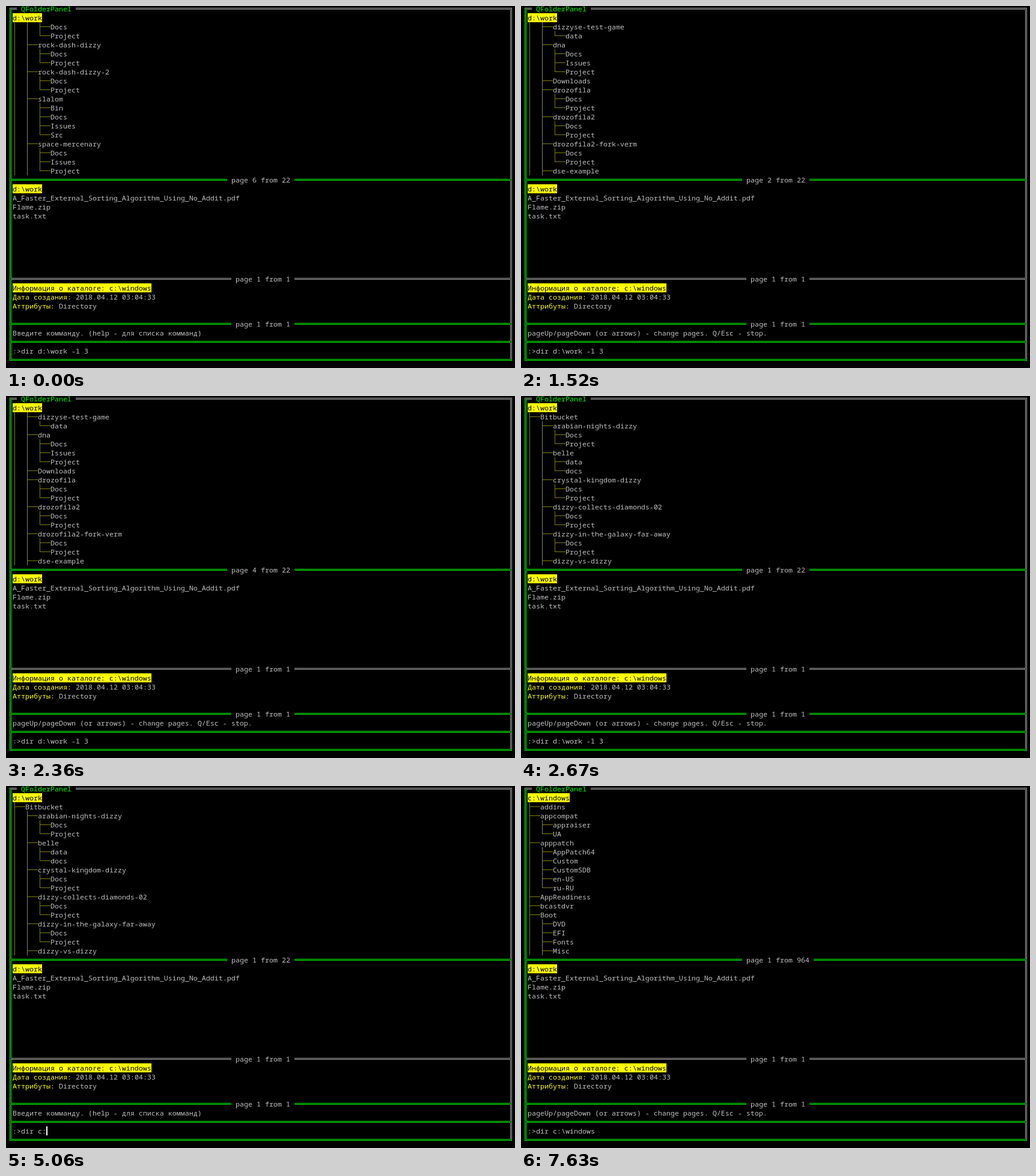
Animation of 847 by 603 pixels, one loop 8 s. Source, as an HTML page with a canvas:

```html
<!DOCTYPE html>
<html lang="ru">
<head>
<meta charset="utf-8">
<title>File manager</title>
<style>
  html, body { margin: 0; width: 100%; height: 100%; overflow: hidden; background: #000; }
  canvas { display: block; }
</style>
</head>
<body>
<canvas id="screen" width="847" height="603"></canvas>
<script>
const ctx = document.getElementById('screen').getContext('2d');
const LOOP = 8000, PAGE_ROWS = 17;
const CELL_W = 7, CELL_H = 15, LEFT = 4, TOP = -3;
const GREEN = '#00ff00', GREY = '#c0c0c0', YELLOW = '#ffff00', OLIVE = '#808000', DIM = '#a8a8a8';
const BRANCH_COLORS = [OLIVE, '#808080', OLIVE];

// "name/" holds Docs and Project, "name:a,b" holds a and b.
function parseTree(text, depth) {
  return text.trim().split(/\s+/).flatMap(item => {
    const [name, list] = item.replace(/\/$/, ':Docs,Project').split(':');
    const children = list ? list.split(',') : [];
    return [{ name, depth }, ...children.map(child => ({ name: child, depth: depth + 1 }))];
  });
}

// An entry closes its branch when a shallower entry comes before the next sibling.
function markLast(entries) {
  entries.forEach((entry, i) => {
    const next = entries.slice(i + 1).find(other => other.depth <= entry.depth);
    entry.last = !!next && next.depth < entry.depth;
  });
  return entries;
}

const work = {
  path: 'd:\\work', pages: 22,
  entries: markLast([{ name: 'Bitbucket', depth: 0 }, ...parseTree(`
    arabian-nights-dizzy/ belle:data,docs crystal-kingdom-dizzy/
    dizzy-collects-diamonds-02/ dizzy-in-the-galaxy-far-away/ dizzy-vs-dizzy/
    dizzy-winter-tale/ dizzy-wonder-island/ dizzy-world-tour/ dizzy-zero-hour/ dizzyse-core/
    dizzyse-test-game:data dna:Docs,Issues,Project Downloads
    drozofila/ drozofila2/ drozofila2-fork-verm/ dse-example:Bin,Docs,Src
    editor/ escape/ flame/ forest-quest/ graphics island-dizzy/
    jungle/ labyrinth/ magic-land/ maze-walker/ notes:data robot/
    rock-dash-dizzy/ rock-dash-dizzy-2/ slalom:Bin,Docs,Issues,Src
    space-mercenary:Docs,Issues,Project tools`, 1)])
};

const windows = {
  path: 'c:\\windows', pages: 964,
  entries: markLast(parseTree(`
    addins appcompat:appraiser,UA apppatch:AppPatch64,Custom,CustomSDB,en-US,ru-RU
    AppReadiness bcastdvr Boot:DVD,EFI,Fonts,Misc`, 0))
};

const ASK = 'Введите комманду. (help - для списка комманд)';
const PAGING = 'pageUp/pageDown (or arrows) - change pages. Q/Esc - stop.';

// page is the listing shown, label is the number in the divider.
const initial = { dir: work, page: 6, label: 6, hint: ASK, command: 'dir d:\\work -l 3', cursor: '' };
const turnPage = (time, page) => [[time, { page }], [time + 30, { label: page }]];

const typed = 'dir c:\\windows';
const keyTimes = [3920, 4010, 4160, 4340, 4770, 5060, 5530, 5810, 6040, 6120, 6510, 6710, 6850, 7060];

const events = [
  [520, { cursor: 'below' }],
  [610, { page: 1 }],
  [640, { label: 1 }],
  [670, { hint: PAGING, cursor: '' }],
  ...turnPage(1300, 2), ...turnPage(1520, 3), ...turnPage(1640, 4),
  ...turnPage(1810, 5), ...turnPage(2170, 4),
  ...turnPage(2360, 3), ...turnPage(2480, 2), ...turnPage(2640, 1),
  [3060, { hint: ASK }],
  [3090, { command: '', cursor: 'line' }],
  [3600, { cursor: '' }],
  ...keyTimes.map((time, i) => [time, { command: typed.slice(0, i + 1), cursor: 'line' }]),
  [7420, { cursor: 'below' }],
  [7560, { dir: windows }],
  [7630, { hint: PAGING, cursor: '' }]
];

const stateAt = time => Object.assign({}, initial,
  ...events.filter(([start]) => start <= time).map(([, change]) => change));

const colX = col => LEFT + col * CELL_W;
const rowY = row => TOP + row * CELL_H;

function fill(x, y, w, h, color) {
  ctx.fillStyle = color;
  ctx.fillRect(x, y, w, h);
}

function print(col, row, text, color = GREY, back) {
  if (back) fill(colX(col), rowY(row), text.length * CELL_W, CELL_H, back);
  ctx.fillStyle = color;
  ctx.fillText(text, colX(col), rowY(row) + 12);
}

function drawFrame() {
  const dividers = [0, 19, 30, 35, 37, 39];
  const bottom = rowY(39) + 8;
  fill(6, 3, 1, bottom - 2, GREEN);
  fill(841, 3, 1, bottom - 2, DIM);
  dividers.forEach((row, i) => {
    const y = rowY(row), color = row === 0 || row === 30 ? DIM : GREEN;
    const outerTop = row === 0, outerBottom = row === 39;
    fill(outerTop ? 6 : 8, y + 6, outerTop ? 836 : 832, 1, color);
    fill(outerBottom ? 6 : 8, y + 8, outerBottom ? 836 : 832, 1, color);
    if (outerBottom) return;
    const height = rowY(dividers[i + 1]) + 6 - (y + 8);
    fill(8, y + 8, 1, height, GREEN);
    fill(839, y + 8, 1, height, DIM);
  });
}

function drawTree({ dir, page }) {
  print(1, 1, dir.path, '#000', YELLOW);
  const start = (page - 1) * PAGE_ROWS;
  dir.entries.slice(start, start + PAGE_ROWS).forEach(({ name, depth, last }, i) => {
    const row = i + 2, y = rowY(row);
    for (let level = 0; level <= depth; level++) {
      const x = colX(1 + level * 3) + 3;
      const ends = level === depth && last;
      fill(x, y, 1, ends ? 8 : CELL_H, BRANCH_COLORS[level]);
    }
    fill(colX(1 + depth * 3) + 4, y + 7, 17, 1, OLIVE);
    print(4 + depth * 3, row, name);
  });
}

function drawPager(col, row, page, pages) {
  print(col, row, ` page ${page} from ${pages} `, GREY, '#000');
}

function render(time) {
  const state = stateAt(time);
  fill(0, 0, 847, 603, '#000');
  ctx.font = `${CELL_W / 0.6}px "Noto Sans Mono", monospace`;

  drawFrame();
  print(2, 0, ' QFolderPanel ', GREEN, '#000');
  drawTree(state);
  drawPager(52, 19, state.label, state.dir.pages);

  print(1, 20, 'd:\\work', '#000', YELLOW);
  ['A_Faster_External_Sorting_Algorithm_Using_No_Addit.pdf', 'Flame.zip', 'task.txt']
    .forEach((name, i) => print(1, 21 + i, name));
  drawPager(53, 30, 1, 1);

  print(1, 31, 'Информация о каталоге: c:\\windows', '#000', YELLOW);
  print(1, 32, 'Дата создания:', YELLOW);
  print(16, 32, '2018.04.12 03:04:33');
  print(1, 33, 'Аттрибуты:', YELLOW);
  print(12, 33, 'Directory');
  drawPager(53, 35, 1, 1);

  print(1, 36, state.hint);
  print(1, 38, ':>' + state.command);
  if (state.cursor === 'line') fill(colX(3 + state.command.length), rowY(38), 2, CELL_H, '#fff');
  if (state.cursor === 'below') fill(LEFT, rowY(39), 2, CELL_H, '#fff');
}

function tick() {
  render(performance.now() % LOOP);
  requestAnimationFrame(tick);
}
tick();
</script>
</body>
</html>
```
